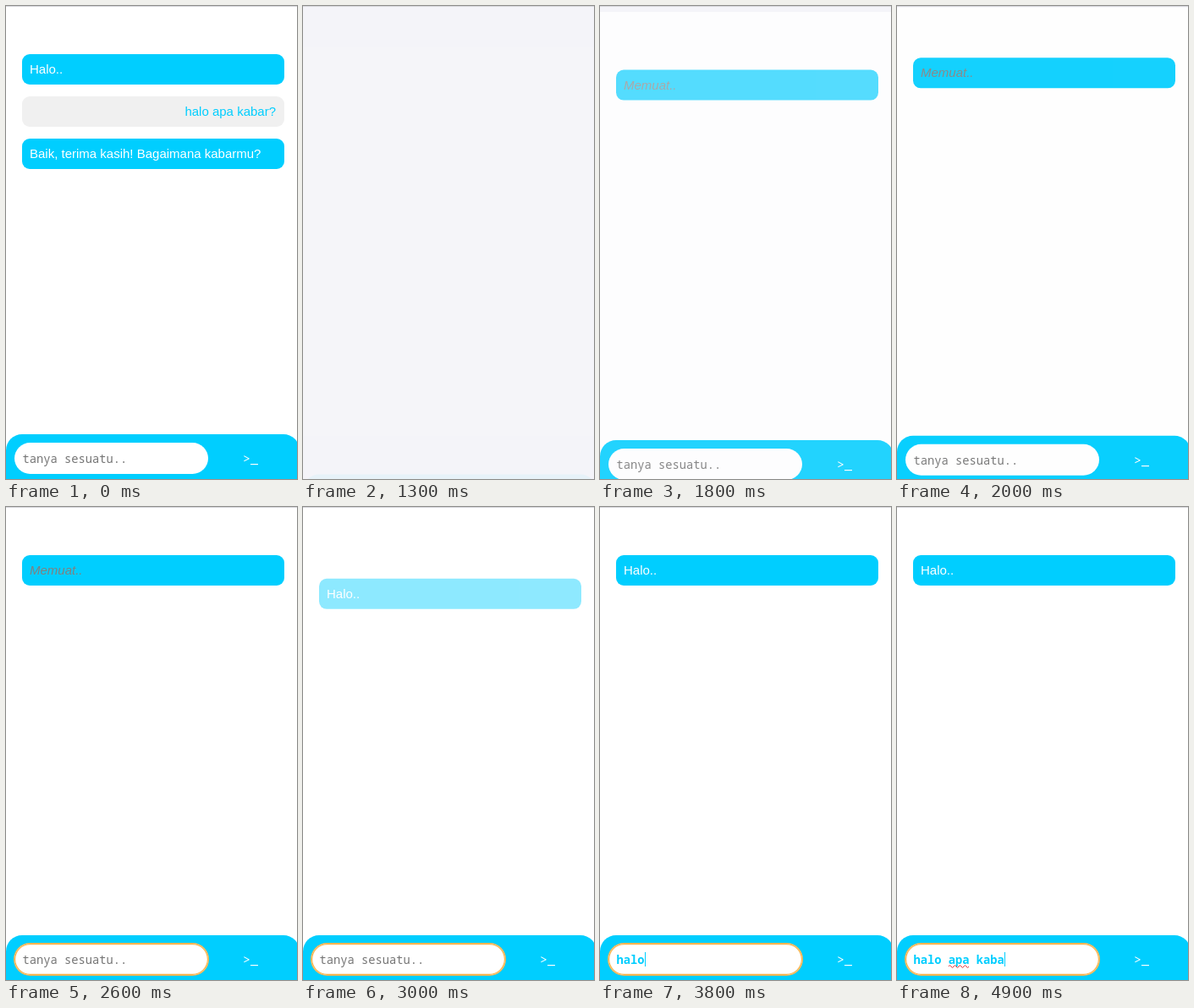
An HTML page that plays this animation: 344 px wide and 560 px high, repeating every 5000 ms.

```html
<!DOCTYPE html>
<html lang="id">
<head>
<meta charset="utf-8">
<title>Chat</title>
<style>
  :root { --cyan: #00ceff; }
  * { box-sizing: border-box; }
  html, body { margin: 0; width: 100%; height: 100%; overflow: hidden; background: #f4f4f9; }
  #stage { position: relative; width: 344px; height: 560px; overflow: hidden; }
  #stage::after { content: ""; position: absolute; inset: 0 0 auto; height: 1px; background: #d8d8dd; }
  #chat { position: absolute; inset: 0; background: #fff; }
  #chat > *, #field > * { position: absolute; }

  .msg {
    left: 18.5px; top: 56.5px; width: 310px; height: 36px; padding: 0 9.5px;
    border-radius: 9px; background: var(--cyan); color: #fff;
    font: 15px/36px "Liberation Sans", Arial, sans-serif; white-space: pre;
  }
  .user { top: 106.5px; background: #f0f0f0; color: var(--cyan); text-align: right; }
  .reply { top: 156.5px; }
  .loading { color: #808080; font-style: italic; }

  #bar {
    left: 0; top: 506.5px; width: 347px; height: 54px;
    border-radius: 19px 19px 0 0; background: var(--cyan);
  }
  #field {
    left: 10px; top: 517px; width: 229px; height: 37px; border-radius: 18.5px; background: #fff;
    font: 13.75px/37px "Noto Sans Mono", "DejaVu Sans Mono", monospace; white-space: pre;
  }
  #field.focus { box-shadow: 0 0 0 1px #f9b550, inset 0 0 0 1.2px #f9b550; }
  #hint, #typed { left: 9.5px; top: 0; }
  #hint { color: #757575; }
  #typed { color: var(--cyan); font-weight: bold; }
  #caret { top: 10px; width: 1px; height: 17px; background: var(--cyan); }
  #wave { left: 51px; top: 24px; fill: none; stroke: #e0343c; }
  #send {
    left: 280px; top: 517px; color: #fff;
    font: 15px/37px "Noto Sans Mono", "DejaVu Sans Mono", monospace;
  }
  [hidden] { display: none; }
</style>
</head>
<body>
<div id="stage">
  <div id="chat">
    <div class="msg" id="hello">Halo..</div>
    <div class="msg user" id="ask">halo apa kabar?</div>
    <div class="msg reply" id="reply">Baik, terima kasih! Bagaimana kabarmu?</div>
    <div class="msg loading" id="loading">Memuat..</div>
    <div id="bar"></div>
    <div id="field">
      <span id="hint">tanya sesuatu..</span>
      <span id="typed"></span>
      <svg id="wave" width="25" height="6"><path d="M0 3q1.5-3 3 0t3 0 3 0 3 0 3 0 3 0 3 0 3 0"/></svg>
      <i id="caret"></i>
    </div>
    <div id="send">&gt;_</div>
  </div>
</div>
<script>
const LOOP = 5000, TICK = 100;
const RELOAD = 1300, FOCUS = 2300, ANSWER = 2800, TYPE = 3600, RESUME = 4400;
const TEXT = "halo apa kaba";
const $ = id => document.getElementById(id);
const show = (id, on) => { $(id).hidden = !on; };
const bez = (u, a, b) => 3 * u * (1 - u) ** 2 * a + 3 * u * u * (1 - u) * b + u ** 3;

// The CSS "ease" curve
function ease(x) {
  if (x <= 0) return 0;
  if (x >= 1) return 1;
  let lo = 0, hi = 1;
  for (let i = 0; i < 24; i++) {
    const mid = (lo + hi) / 2;
    if (bez(mid, .25, .25) < x) lo = mid; else hi = mid;
  }
  return bez(lo, .1, 1);
}

// Fade in while rising 50px
function rise(id, x) {
  const p = ease(x), style = $(id).style;
  style.opacity = p;
  style.transform = p < 1 ? `translateY(${50 * (1 - p)}px)` : "none";
}

function typedCount(t) {
  if (t < TYPE) return 0;
  if (t < RESUME) return Math.min(4, 1 + Math.floor((t - TYPE) / TICK * 2));
  return 5 + Math.floor((t - RESUME) / TICK * 1.6);
}

function draw(t) {
  const done = t < RELOAD;
  rise("chat", done ? 1 : (t - 1235) / 1000);
  rise("loading", (t - 1426) / 800);
  rise("hello", done ? 1 : (t - 2787) / 800);
  show("loading", !done && t < ANSWER);
  show("hello", done || t >= ANSWER);
  show("ask", done);
  show("reply", done);

  const n = typedCount(t);
  $("field").classList.toggle("focus", t >= FOCUS);
  $("typed").textContent = TEXT.slice(0, n);
  show("hint", !n);
  show("caret", n);
  $("caret").style.left = 9.5 + n * 8.25 + "px";
  $("wave").style.display = n > 8 ? "block" : "none";
}

const start = performance.now();
function frame() {
  const t = (performance.now() - start) % LOOP;
  draw(Math.floor(t / TICK) * TICK);
  requestAnimationFrame(frame);
}
frame();
</script>
</body>
</html>
```
